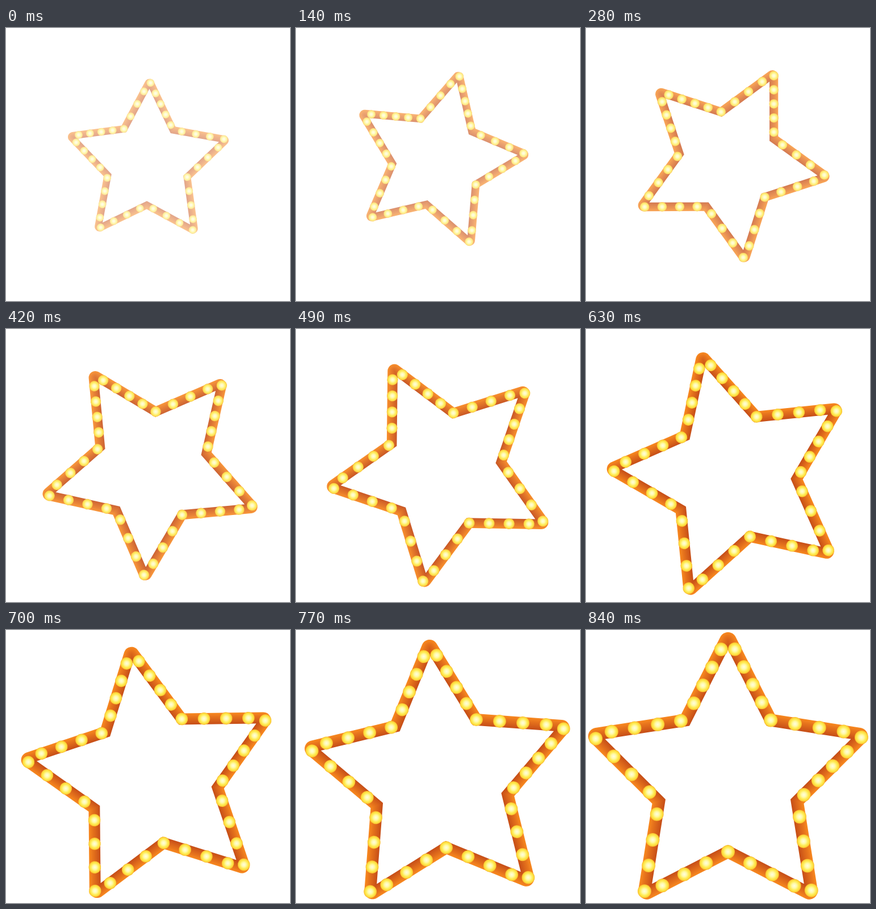
An HTML page with a canvas for the animation above (0.91 s loop, 500 by 480 pixels).

```html
<!DOCTYPE html>
<html lang="en">
<head>
<meta charset="utf-8">
<title>Marquee star</title>
<style>
  html, body { margin: 0; width: 100%; height: 100%; overflow: hidden; background: #fff; }
  canvas { display: block; width: 500px; height: 480px; }
</style>
</head>
<body>
<canvas id="stage" width="500" height="480"></canvas>
<script>
const canvas = document.getElementById('stage');
const ctx = canvas.getContext('2d');
const STEP = 70, STEPS = 13, FADE_STEPS = 8;

// Star geometry at full size: tip and notch distance, half band width, tip rounding
const TIP = 252, NOTCH = 128, HALF = 11, ROUND = 15, BULB = 12, LAYERS = 12;
const wedge = Math.PI / 5;
const edge = Math.hypot(TIP - NOTCH * Math.cos(wedge), NOTCH * Math.sin(wedge));
const apothem = TIP * NOTCH * Math.sin(wedge) / edge;

const RIM = [246, 134, 31], INNER = [200, 80, 24];

// Where each edge's four bulbs begin, measured in edges from the top tip
const BULB_STARTS = [0.16, 1, 2.04, 2.9, 3.95, 5, 6.04, 7.14, 8.21, 9.2, 10.05];

const lerp = (a, b, t) => a + (b - a) * t;
const mix = (a, b, t) => a.map((v, i) => Math.round(lerp(v, b[i], t)));

// Straight travel plus a few harmonics that vanish at both ends
const sway = (from, to, p, ...waves) => waves.reduce(
  (sum, size, i) => sum + size * Math.sin((i + 1) * Math.PI * p), lerp(from, to, p));

function corner(i, k = 1) {
  const r = k * (i % 2 ? NOTCH : TIP);
  return [r * Math.sin(i * wedge), -r * Math.cos(i * wedge)];
}

function pointAt(u) {
  const i = Math.floor(u), [x0, y0] = corner(i), [x1, y1] = corner(i + 1);
  return [lerp(x0, x1, u - i), lerp(y0, y1, u - i)];
}

// Star outline moved outwards by `offset`
function fillStar(offset, color) {
  const k = 1 + offset / apothem;
  const round = Math.max(0, ROUND - HALF + offset);
  ctx.beginPath();
  ctx.moveTo(...corner(-1, k));
  for (let i = 0; i < 10; i += 2) {
    ctx.arcTo(...corner(i, k), ...corner(i + 1, k), round);
    ctx.lineTo(...corner(i + 1, k));
  }
  ctx.closePath();
  ctx.fillStyle = color;
  ctx.fill();
}

function drawBulb(x, y) {
  const glow = ctx.createRadialGradient(x, y, 0, x, y, BULB);
  glow.addColorStop(0, '#fffdde');
  glow.addColorStop(0.35, '#fff9aa');
  glow.addColorStop(0.62, '#ffef5c');
  glow.addColorStop(0.86, '#fdd93c');
  glow.addColorStop(1, '#f9b82c');
  ctx.fillStyle = glow;
  ctx.beginPath();
  ctx.arc(x, y, BULB, 0, Math.PI * 2);
  ctx.fill();
}

function draw(step) {
  const p = step / (STEPS - 1);
  const scale = sway(0.575, 1, p, -0.028, 0, -0.01);
  canvas.style.opacity = Math.min(1, lerp(0.5, 1, step / FADE_STEPS));
  ctx.setTransform(1, 0, 0, 1, 0, 0);
  ctx.clearRect(0, 0, 500, 480);
  ctx.translate(sway(249.5, 250, p, 7.5, -5), sway(237.8, 262, p, -6.3, -6.3));
  ctx.rotate(sway(-70.7, 0, p, 3, -0.7) * Math.PI / 180);
  ctx.scale(scale, scale);

  for (let i = 0; i < LAYERS; i++) {
    fillStar(lerp(HALF, -HALF, i / LAYERS), `rgb(${mix(RIM, INNER, i / (LAYERS - 1))})`);
  }
  fillStar(-HALF, '#fff');
  for (let i = 0; i < 10; i++) {
    for (let j = 0; j < 4; j++) {
      drawBulb(...pointAt(lerp(BULB_STARTS[i], BULB_STARTS[i + 1], j / 4)));
    }
  }
}

const start = performance.now();
function tick(now) {
  draw(Math.floor(Math.max(0, now - start) / STEP) % STEPS);
  requestAnimationFrame(tick);
}
draw(0);
requestAnimationFrame(tick);
</script>
</body>
</html>
```
